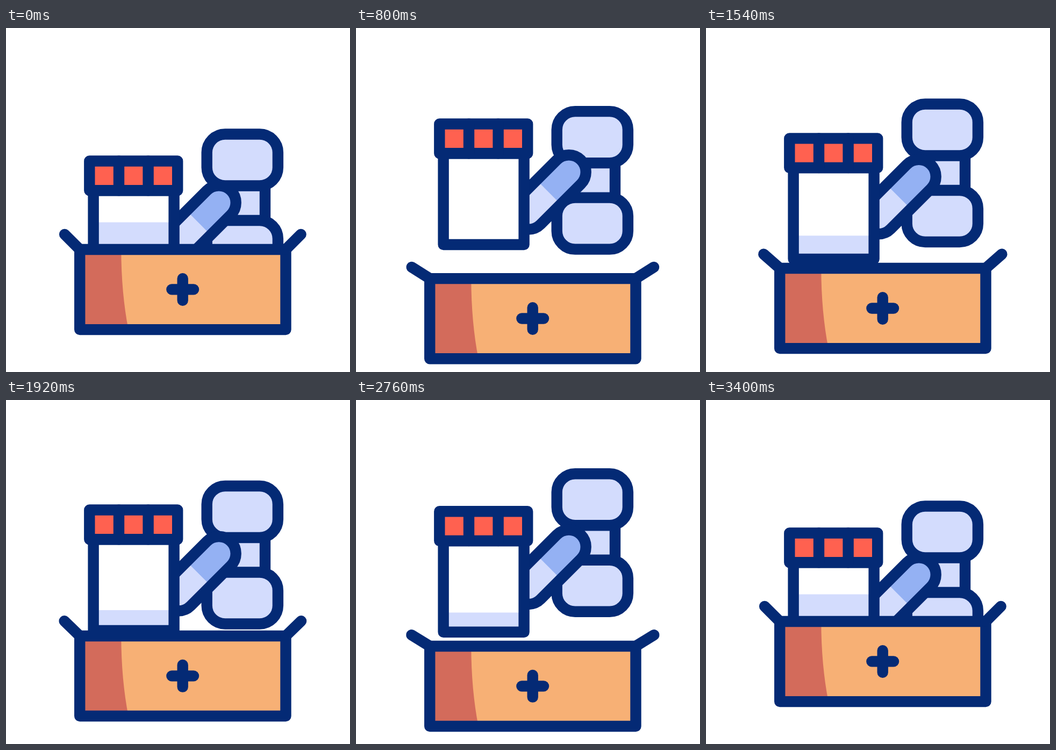
Animation, 640 px wide and 640 px high, one loop 3620 ms. Source, as an HTML page with a canvas:

```html
<!DOCTYPE html>
<html lang="en">
<head>
<meta charset="utf-8">
<title>Medicine box</title>
<style>
  html, body { margin: 0; width: 100%; height: 100%; overflow: hidden; background: #fff; }
  canvas { display: block; width: 640px; height: 640px; }
</style>
</head>
<body>
<canvas id="stage" width="640" height="640"></canvas>
<script>
const ctx = document.getElementById('stage').getContext('2d');
const LOOP = 3620, TICK = 20, START = 200;
const NAVY = '#042a75', RED = '#ff6150', PALE = '#d3dcfd', BLUE = '#94b1f3';
const ORANGE = '#f7b075', SHADE = '#d36b5b', WHITE = '#fff';

// Eased travel through rest, high, mid, high, rest.
function swing(t, delay, step, high, mid, high2) {
  const keys = [0, high, mid, high2, 0];
  const p = Math.min(4, Math.max(0, (t - START - delay) / step));
  const i = Math.min(3, Math.floor(p));
  const s = p - i;
  return keys[i] + (keys[i + 1] - keys[i]) * s * s * (3 - 2 * s);
}

function line(x1, y1, x2, y2) {
  ctx.beginPath();
  ctx.moveTo(x1, y1);
  ctx.lineTo(x2, y2);
  ctx.stroke();
}

function block(x, y, w, h, fill) {
  ctx.fillStyle = fill;
  ctx.fillRect(x, y, w, h);
}

function shifted(dy, draw) {
  ctx.save();
  ctx.translate(0, dy);
  draw();
  ctx.restore();
}

function pad(y) {
  ctx.beginPath();
  ctx.roundRect(373.7, y, 132.2, 96, 34);
  ctx.fillStyle = PALE;
  ctx.fill();
  ctx.stroke();
}

function drawFlask() {
  block(397.6, 293.5, 84.4, 64.5, PALE);
  line(397.6, 293.5, 397.6, 358);
  line(482, 293.5, 482, 358);
  pad(197.5);
  pad(358);
}

function drawPill() {
  const r = 31.7, len = 75 * Math.SQRT2;
  ctx.translate(396, 325);
  ctx.rotate(Math.PI * 3 / 4);
  ctx.beginPath();
  ctx.roundRect(-r, -r, len + 2 * r, 2 * r, r);
  ctx.save();
  ctx.clip();
  block(-r, -r, len + 2 * r, 2 * r, PALE);
  block(-r, -r, len / 2 + r, 2 * r, BLUE);
  ctx.restore();
  ctx.stroke();
}

function drawJar(drop) {
  const left = 162.6, width = 150, floor = 472, level = 361.5 + drop;
  block(left, 302.2, width, floor - 302.2, WHITE);
  if (level < floor) block(left, level, width, floor - level, PALE);
  ctx.strokeRect(left, 302.2, width, floor - 302.2);
  block(155.3, 247.5, 163.9, 54.7, RED);
  ctx.strokeRect(155.3, 247.5, 163.9, 54.7);
  for (const x of [210, 264.6]) line(x, 247.5, x, 302.2);
}

function drawBox(lift) {
  const left = 137.2, right = 520.5, top = 412, base = 561.1;
  block(left, top, right - left, base - top, ORANGE);
  ctx.beginPath();
  ctx.moveTo(left, top);
  ctx.lineTo(214.3, top);
  ctx.bezierCurveTo(214.3, 465, 219, 517, 227.8, base);
  ctx.lineTo(left, base);
  ctx.fillStyle = SHADE;
  ctx.fill();
  ctx.strokeRect(left, top, right - left, base - top);

  const a = (45 - lift) * Math.PI / 180;
  const dx = 39.8 * Math.cos(a), dy = 39.8 * Math.sin(a);
  line(left, top, left - dx, top - dy);
  line(right, top, right + dx, top - dy);

  line(308.4, 486.4, 349, 486.4);
  line(328.7, 466.1, 328.7, 506.7);
}

function draw(t) {
  const rise = delay => -swing(t, delay, 750, 77, 37.5, 64);
  block(0, 0, 640, 640, WHITE);
  ctx.strokeStyle = NAVY;
  ctx.lineWidth = 20.4;
  ctx.lineCap = ctx.lineJoin = 'round';
  shifted(rise(200), drawFlask);
  shifted(rise(100), drawPill);
  shifted(rise(0), () => drawJar(swing(t, 0, 750, 115.5, 60.5, 118)));
  shifted(swing(t, 0, 800, 64.2, 25.4, 51.3),
    () => drawBox(swing(t, 0, 800, 15, 0, 15)));
}

const begin = performance.now();
function frame() {
  const t = (performance.now() - begin) % LOOP;
  draw(Math.floor(t / TICK) * TICK);
  requestAnimationFrame(frame);
}
frame();
</script>
</body>
</html>
```
